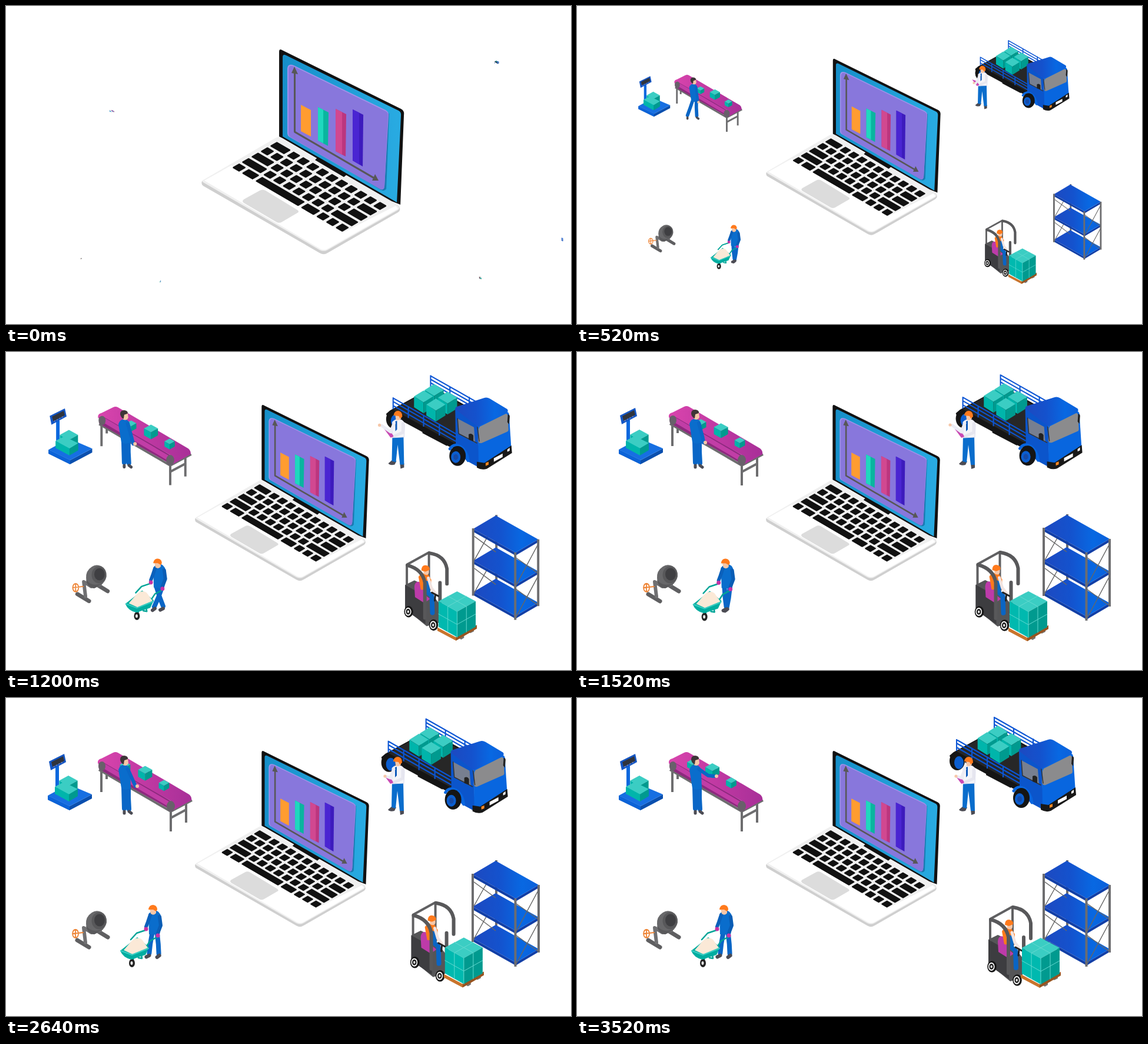
Recreate the animation shown at these times as an HTML page. Size 960 px wide and 541 px high, loop 3560 ms.

```html
<!DOCTYPE html>
<html lang="en">
<head>
<meta charset="utf-8">
<title>Warehouse logistics</title>
<style>
html, body { margin: 0; width: 100%; height: 100%; overflow: hidden; background: #fff; }
svg { display: block; width: 100vw; height: 100vh; }
.ln { fill: none; stroke-linecap: round; stroke-linejoin: round; }
.rail { fill: none; stroke: #0b55d4; stroke-width: 2.1; }
.suit { fill: #0a6dcc; }
.leg { fill: none; stroke: #0a66c6; stroke-width: 8; stroke-linecap: round; stroke-linejoin: round; }
.skin { fill: #f6c7a8; }
.hat { fill: #ff7a1c; }
.shoe { fill: #4c4c54; }
.steel { fill: none; stroke: #6d6d6f; stroke-width: 4; }
.wire { fill: none; stroke: #666; stroke-width: 1.5; }
</style>
</head>
<body>
<svg viewBox="0 0 960 541" preserveAspectRatio="none">
<defs>
  <linearGradient id="blue"><stop stop-color="#1d49c0"/><stop offset=".4" stop-color="#1452cd"/><stop offset=".75" stop-color="#0868e2"/><stop offset="1" stop-color="#0b60da"/></linearGradient>
  <linearGradient id="belt"><stop stop-color="#d944ad"/><stop offset="1" stop-color="#a82f98"/></linearGradient>
  <linearGradient id="screen"><stop stop-color="#168fc9"/><stop offset="1" stop-color="#29abe2"/></linearGradient>
  <g id="cube">
    <path fill="#3bcdc3" d="M0 0 12 6.6 0 13.2-12 6.6Z"/>
    <path fill="#00b5ab" d="M-12 6.6 0 13.2V25.2L-12 18.6Z"/>
    <path fill="#009a8f" d="M12 6.6 0 13.2V25.2L12 18.6Z"/>
  </g>
  <g id="tire">
    <ellipse rx="7.8" ry="9.8" fill="#161616"/>
    <ellipse cx="-.8" rx="5.4" ry="7" fill="#fff"/>
    <ellipse cx="-.8" rx="3.8" ry="5" fill="#222"/>
    <ellipse cx="-.8" rx="1.6" ry="2.2" fill="#eee"/>
  </g>
  <g id="board">
    <path fill="#123fa6" d="M793 300 866 341 905 318V323L866 346 793 305Z"/>
    <path fill="url(#blue)" d="M793 300 832 277 905 318 866 341Z"/>
  </g>
</defs>

<g id="camera">
  <g transform="matrix(.86 0 0 .86 35.3 26.4)">
    <path fill="#111" d="M464 78Q464 72 469 75L671 175Q677 178 676 185L670 338 655 332 464 222Z"/>
    <path fill="url(#screen)" d="M470 87Q470 81 476 84L667 178Q671 180 671 185L664 334 470 222Z"/>
    <path fill="#1b7ab2" d="M483 105 651 183 646 311Q643 316 637 313L483 222Z"/>
    <path fill="#a091ea" d="M478 106Q479 97 489 101L645 177Q650 180 650 185L643 306Q642 315 635 311L482 223Q478 221 478 216Z"/>
    <path fill="#8877dc" d="M480 107Q481 99 489 103L645 179Q650 182 649 187L643 306Q642 315 635 311L483 223Q480 221 480 216Z"/>
    <path class="ln" stroke="#575757" stroke-width="3" d="M490.5 111V214L626 293"/>
    <path fill="#575757" d="M490 103 496 116 485 114ZM633 297 627 286 622 297Z"/>
    <path fill="#ff9c30" d="M501 168 518 177V222L501 213Z"/>
    <path fill="#0ab59f" d="M530 172 548 181 547 238 530 229Z"/>
    <path fill="#1fd8be" d="M530 172 539 176.500V233.500L530 229Z"/>
    <path fill="#bb367f" d="M560 175 578 184 577 256 560 247Z"/>
    <path fill="#d14890" d="M560 175 571 180.500V253L560 247Z"/>
    <path fill="#3d1bbd" d="M589 176 607 185 606 273 589 263Z"/>
    <path fill="#4a25d2" d="M589 176 600 181.500V269.500L589 263Z"/>
    <path fill="#cfcfcf" d="M333 298 457 226Q463 222 470 226L667 340Q672 347 666 351L546 420Q540 424 533 420L335 306Q331 303 333 298Z"/>
    <path fill="#f0f0f0" d="M335 296 457 225Q463 221 470 225L666 340Q670 344 666 347L546 415Q540 418 533 415L335 300Q332 298 335 296Z"/>
    <path fill="#fff" d="M337 297 383 271 573 385 662 340 666 345 546 413Q540 416 534 413Z"/>
    <path fill="#111" d="M525 262 530 257 580 286 574 291Z"/>
    <path fill="#dcdcdc" d="M404 329 431 314Q436 311 441 314L495 347Q499 350 495 352L469 367Q464 370 459 367L404 335Q400 332 404 329Z"/>
    <g id="keys" fill="#111" stroke="#111" stroke-width="2.500" stroke-linejoin="round"/>
  </g>

  <g id="plant">
    <path fill="#0a4fae" d="M71 166 108 184 146 164V171L108 191 71 173Z"/>
    <path fill="#0b63d8" d="M71 166 108 184V191L71 173Z"/>
    <path fill="#176fe2" d="M71 166 106 147 146 164 108 184Z"/>
    <path fill="#0b68de" d="M84 116H90V163L84 160Z"/>
    <path fill="#1456c4" d="M73 108 99 95 102 109 76 123Z"/>
    <path fill="#30343c" d="M77 109 97 99 99 107 79 117Z"/>
    <path class="ln" stroke="#88a" stroke-width="1.500" stroke-dasharray="1 4" d="M81 117 98 108"/>
    <use href="#cube" transform="translate(106 132) scale(1.3)"/>
    <path fill="#3bcdc3" d="M83 151 98 143 122 155 107 164Z"/>
    <path fill="#00b5ab" d="M83 151 107 164V176L83 163Z"/>
    <path fill="#009a8f" d="M122 155 107 164V176L122 167Z"/>

    <path class="steel" d="M162 121V160M171 125V138M280 190V227M306 178V212M280 204 306 190"/>
    <path class="steel" stroke-width="3" d="M158 122 280 193 316 174"/>
    <path fill="#8d297e" d="M157 107 168 108 283 177 284 192 274 187 158 121Z"/>
    <path fill="url(#belt)" d="M156 108Q157 104 162 103L182 93Q186 91 190 93L311 164Q316 168 315 174L284 191Q288 178 278 174L168 111Q160 107 156 112Z"/>
    <path class="ln" stroke="#c13da6" stroke-width="8" d="M167 116 274 179"/>
    <ellipse cx="163" cy="116" rx="6" ry="8" fill="#68606a"/>
    <ellipse cx="280" cy="184" rx="7" ry="9" fill="#68606a"/>
    <g id="cargo">
      <use href="#cube" transform="translate(230 111)"/>
      <use href="#cube" transform="translate(262 135) scale(.74)"/>
      <use href="#cube" transform="translate(196 104) scale(.74)"/>
    </g>
    <path id="stride" class="leg"/>
    <path id="boots" class="ln" stroke="#4c4c54" stroke-width="5"/>
    <path class="suit" d="M191 122Q194 112 203 114 211 116 211 126L212 153Q204 159 196 153Z"/>
    <path id="reach" class="ln" stroke="#0a66c6" stroke-width="6"/>
    <circle id="palm" class="skin" r="3"/>
    <path class="skin" d="M198 104 207 103 208 111Q205 117 199 114Z"/>
    <path fill="#3d3538" d="M194 105Q194 98 201 98 208 99 207 104L201 106 200 113Q195 111 194 105Z"/>
  </g>

  <g id="yard">
    <g id="truck">
      <ellipse cx="646" cy="107" rx="13" ry="16" fill="#161616"/>
      <ellipse cx="649" cy="110" rx="8" ry="11" fill="#0b5ed0"/>
      <path fill="#151515" d="M633 98 640 92 713 52 780 90 752 158 741 154 660 110 650 96 640 98 636 106ZM695 122 737 145V153L695 131Z"/>
      <path fill="#272727" d="M645 91 712 54 772 88 752 126 751 149Z"/>
      <path class="rail" d="M709 32V54M742 51V73M775 69V90M709 33 790 79M709 39 790 85M709 45 790 91"/>
      <use href="#cube" transform="translate(715 47) scale(1.36 1.55)"/>
      <use href="#cube" transform="translate(697 58) scale(1.36 1.55)"/>
      <use href="#cube" transform="translate(738 60) scale(1.36 1.55)"/>
      <use href="#cube" transform="translate(718 72) scale(1.36 1.55)"/>
      <path class="rail" d="M645 70V90M671 85V105M697 100V120M724 115V135M645 71 752 132M645 77 752 138M645 84 752 145"/>
      <path fill="#0b55cb" d="M751 89 790 119 792 190 770 178 752 154Z"/>
      <path fill="#0866df" d="M790 119 838 95Q842 94 843 99L847 160 800 191 791 188Z"/>
      <path fill="url(#blue)" d="M751 90Q751 86 756 85L800 71Q805 69 810 72L840 90Q842 93 840 95L790 120Z"/>
      <path fill="#777f90" d="M755 106 783 121 785 147 757 132Z"/>
      <path fill="#8b8b8d" d="M793 120 837 98Q840 97 841 102L842 125Q842 128 839 129L796 148Q791 149 790 144L791 124Z"/>
      <path class="ln" stroke="#333" stroke-width="1.500" d="M789 121 792 145M755 106 757 132 788 148"/>
      <path fill="#181818" d="M788 180 801 182 847 152 848 165 805 192Q797 195 788 190Z"/>
      <path fill="#fff" d="M817 174 832 166V172L817 180ZM840 159 844 156V161L840 163Z"/>
      <path fill="#ff8a25" d="M803 182 808 180V185L803 187Z"/>
      <path fill="#222" d="M774 133Q779 130 782 135V145L774 142ZM841 99Q845 99 844 105L843 116 840 112Z"/>
      <path class="ln" stroke="#0866df" stroke-width="5" d="M742 158Q748 148 760 154 771 161 773 178"/>
      <ellipse cx="755" cy="170" rx="14" ry="17" fill="#151515"/>
      <ellipse cx="752" cy="172" rx="8" ry="10" fill="#0b5ed0"/>
      <ellipse cx="752" cy="172" rx="4" ry="5" fill="#174aa5"/>
    </g>
    <path class="shoe" d="M656 184 663 186 660 192Q652 194 649 190ZM669 190H676V197L670 199Z"/>
    <path class="suit" d="M656 141 675 141 676 192H669L665 158 662 188 655 186Z"/>
    <path fill="#f4f4f8" stroke="#dde" d="M656 119Q662 113 670 115 677 117 677 126L676 145 656 146Z"/>
    <path fill="#0c58b9" d="M661 118 664 117 664 132 661 135Z"/>
    <path fill="#c94ab4" d="M642 131 651 134 659 144 653 146Z"/>
    <path id="wave" class="ln" stroke="#ececf4" stroke-width="5"/>
    <circle id="hand" class="skin" r="2.600"/>
    <path class="ln" stroke="#e6e6ef" stroke-width="5" d="M674 122 674 137 660 143"/>
    <path class="skin" d="M661 107H671V113Q668 118 662 115Z"/>
    <path class="hat" d="M658 108Q659 100 666 100 673 101 673 110L669 113 667 109Z"/>
  </g>

  <g id="shelf">
    <path class="steel" d="M833 276V390"/>
    <use href="#board" y="109"/>
    <path class="wire" d="M795 410 832 343M795 368 832 396M867 452 904 383M867 404 904 431"/>
    <use href="#board" y="55"/>
    <path class="wire" d="M795 354 832 288M795 313 832 340M867 397 904 328M867 350 904 376"/>
    <use href="#board"/>
    <path class="steel" d="M793 299V415M865.500 341V457M905 318V433"/>
  </g>

  <g id="depot">
    <g id="lift">
      <path class="ln" stroke="#606062" stroke-width="4" d="M702 377V444M702 376 740 355V411"/>
      <path class="ln" stroke="#58585a" stroke-width="6" d="M741 356Q767 360 771 383V409M759 407V455"/>
      <path fill="#555557" d="M699 411 715 403 734 412 757 442V476L736 482 713 463 699 451Z"/>
      <path fill="#3d3d40" d="M699 411 733 430 734 478 712 463 699 451Z"/>
      <path fill="#bd3ba9" d="M715 414Q716 403 725 406L733 428 742 435 732 442 716 432Z"/>
      <path class="ln" stroke="#0a65c4" stroke-width="8" d="M735 422 745 430 746 459"/>
      <path class="hat" d="M722 397Q727 388 738 392L744 402 743 421 726 419Z"/>
      <path fill="#0b68c5" d="M734 403 743 406 742 426 732 423Z"/>
      <path class="ln" stroke="#f1e4e1" stroke-width="5" d="M739 399 744 416 751 425"/>
      <path class="skin" d="M730 384H740V390Q738 396 731 392Z"/>
      <path class="hat" d="M727 386Q727 377 734 377 742 378 741 385L734 388Z"/>
      <path class="ln" stroke="#222" stroke-width="3" d="M745 424 756 430M751 428 750 438"/>
      <path class="ln" stroke="#58585a" stroke-width="6" d="M703 377Q729 384 733 407V468"/>
      <use href="#tire" x="705" y="457"/>
      <use href="#tire" x="748" y="480"/>
    </g>
    <g id="load">
      <path fill="#75716f" d="M787 486 800 482V488L795 491ZM805 477 817 471V477L811 480Z"/>
      <path fill="#c9742c" d="M754 470 786 487 822 466V472L786 493 754 476Z"/>
      <path fill="#965421" d="M786 487 822 466V472L786 493Z"/>
      <path fill="#3bcdc3" d="M788 408 820 425 788 443 756 425Z"/>
      <path fill="#00b9af" d="M756 425 788 443V487L756 469Z"/>
      <path fill="#009a8f" d="M820 425 788 443V487L820 469Z"/>
      <path class="ln" stroke="#64d9d0" d="M772 416 804 434V478M804 416 772 434V478M756 447 788 465 820 447M788 443V487"/>
    </g>
  </g>

  <g id="mixer">
    <path class="ln" stroke="#5f5f61" stroke-width="7" d="M121 412 141 424M155 396 173 407"/>
    <path class="ln" stroke="#707072" stroke-width="6" d="M132 391 135 416M134 392 145 399 160 395"/>
    <path fill="#68686a" d="M136 385Q135 372 146 365 153 360 162 364 172 369 171 382 169 391 161 397L150 402Q138 401 136 385Z"/>
    <path fill="#59595b" d="M136 387Q145 401 165 393L150 402Q138 401 136 387Z"/>
    <ellipse cx="158" cy="379" rx="12.500" ry="14.500" fill="#58585a"/>
    <ellipse cx="159" cy="378" rx="9" ry="10.500" fill="#3f3f42"/>
    <path class="ln" stroke="#ee8435" stroke-width="1.800" d="M118 394A5 7 0 1 0 118.100 394M113 401 131 399M118 395V407"/>
  </g>

  <g id="mason">
    <g id="walker">
      <path id="legs" class="leg"/>
      <path id="shoes" class="ln" stroke="#4c4c54" stroke-width="6"/>
      <path class="suit" d="M242 368Q246 361 256 362 264 365 264 379L261 403 243 402Z"/>
      <path class="ln" stroke="#0a60bb" stroke-width="6" d="M245 369 241 381 238 389"/>
      <path class="ln" stroke="#00a497" stroke-width="2.500" d="M237 395 222 400 212 411M260 405 245 413 230 436 231 443 225 442M217 442 214 451"/>
      <path class="ln" stroke="#0a5db5" stroke-width="6" d="M261 372 263 387 258 400"/>
      <circle cx="238" cy="393" r="3.500" fill="#c533a6"/>
      <circle cx="258" cy="404" r="3.500" fill="#c533a6"/>
      <ellipse cx="214" cy="451" rx="5" ry="7" fill="#222"/>
      <ellipse cx="213.500" cy="451" rx="2" ry="3" fill="#eee"/>
      <path fill="#00ada0" d="M194 430 223 407 243 424 237 437 213 445Q199 442 194 430Z"/>
      <path fill="#fbe9d7" d="M200 429 213 414Q223 405 231 411L241 425 215 436Z"/>
      <path class="ln" stroke="#3bcdc3" stroke-width="2" d="M195 430 214 437 242 426"/>
      <path class="skin" d="M244 359H255V366Q251 371 246 367Z"/>
      <path class="hat" d="M242 360Q243 352 250 352 257 353 257 360L255 363 250 360Z"/>
    </g>
  </g>
</g>
</svg>
<script>
const LOOP = 3560, STEP = 40;
const el = id => document.getElementById(id);
const set = (id, attrs) => { for (const k in attrs) el(id).setAttribute(k, attrs[k]); };
const clamp = v => Math.min(1, Math.max(0, v));
const move = (id, x, y) => set(id, { transform: `translate(${x} ${y})` });
const zoom = (id, x, y, s) =>
  set(id, { transform: `translate(${x} ${y}) scale(${s}) translate(${-x} ${-y})` });

// Linear path through [time, x, y] stops.
function track(stops, t) {
  let a = stops[0];
  for (const b of stops) {
    if (t < b[0]) {
      const u = a === b ? 0 : (t - a[0]) / (b[0] - a[0]);
      return [a[1] + (b[1] - a[1]) * u, a[2] + (b[2] - a[2]) * u];
    }
    a = b;
  }
  return [a[1], a[2]];
}

const ones = n => Array(n).fill(1);
const rows = [
  [1.75, ...ones(10)],
  [...ones(10), 1.75],
  [2, ...ones(8), 1.75],
  [2.25, ...ones(7), 2.5],
  [1, 1.4, 4.75, 1.6, 1, 1, 1]
];
el('keys').innerHTML = rows.map((row, r) => {
  let n = 0;
  return row.map(w => {
    const x = 450.5 - 16 * r + 16.3 * n, y = 238 + 9.2 * r + 9.5 * n, a = w - .42;
    n += w;
    return `<path d="M${x} ${y}l9.700 -5.600 ${16.3 * a} ${9.5 * a} -9.700 5.600z"/>`;
  }).join('');
}).join('');

// Growth centre and duration of each scene.
const scenes = {
  plant: [190, 181, 1560], yard: [752, 108, 1470], shelf: [848, 368, 1590],
  depot: [728, 424, 1590], mixer: [145, 396, 1560], mason: [260.6, 430, 1590]
};
const reach = [[0, 211, 157], [520, 213, 157], [880, 221, 158], [1520, 218, 154],
  [2200, 218, 152], [2640, 223, 150], [3520, 237, 133]];
const wave = [[0, 646, 139], [520, 646, 139], [880, 634, 125], [1520, 634, 124],
  [2200, 637, 127], [2640, 644, 133]];

function draw(t) {
  zoom('camera', 252, 188, 1 + .163 * (1 - clamp(t / 800)) ** 4);
  for (const id in scenes) {
    const [x, y, time] = scenes[id];
    zoom(id, x, y, 1 - (1 - clamp((t + 15) / time)) ** 3);
  }

  const left = 3520 - t;
  move('cargo', left * .0073, left * .0051);
  move('truck', left * .0053, left * .0031);

  const drive = clamp((t - 1700) / 1820) - 1;
  move('lift', 21.5 * drive, 15 * drive);
  move('load', 21 * drive, drive);

  const [px, py] = track(reach, t);
  set('reach', { d: `M207 121L${(207 + px) / 2 + 1} ${py - 9 + (py < 140 ? 8 : 0)} ${px - 3} ${py}` });
  set('palm', { cx: px, cy: py });
  const foot = 201 - 14 * clamp((880 - t) / 360);
  set('stride', { d: `M200 151L${(foot + 200) / 2} 170 ${foot} 188M208 151V170L209 189` });
  set('boots', { d: `M${foot} 193v3M209 193l4 3` });

  const [hx, hy] = track(wave, t);
  set('wave', { d: `M659 121L653 136 ${hx + 4} ${hy + 1}` });
  set('hand', { cx: hx, cy: hy });

  const walk = Math.max(0, 1680 - t) * .0165;
  move('walker', walk, -.2 * walk);
  const gap = 9 * Math.sin(Math.PI * (Math.min(t, 1680) - 1520) / 500);
  const a = 251 - gap, b = 252 + gap;
  set('legs', { d: `M248 402L${(a + 247) / 2} 418 ${a} 434M257 402L${(b + 258) / 2} 419 ${b} 435` });
  set('shoes', { d: `M${a} 438l-5 2.500M${b + 1} 438l-4 3` });
}

const start = performance.now();
function tick() {
  const t = (performance.now() - start) % LOOP;
  draw(Math.floor(t / STEP) * STEP);
  requestAnimationFrame(tick);
}
tick();
</script>
</body>
</html>
```
